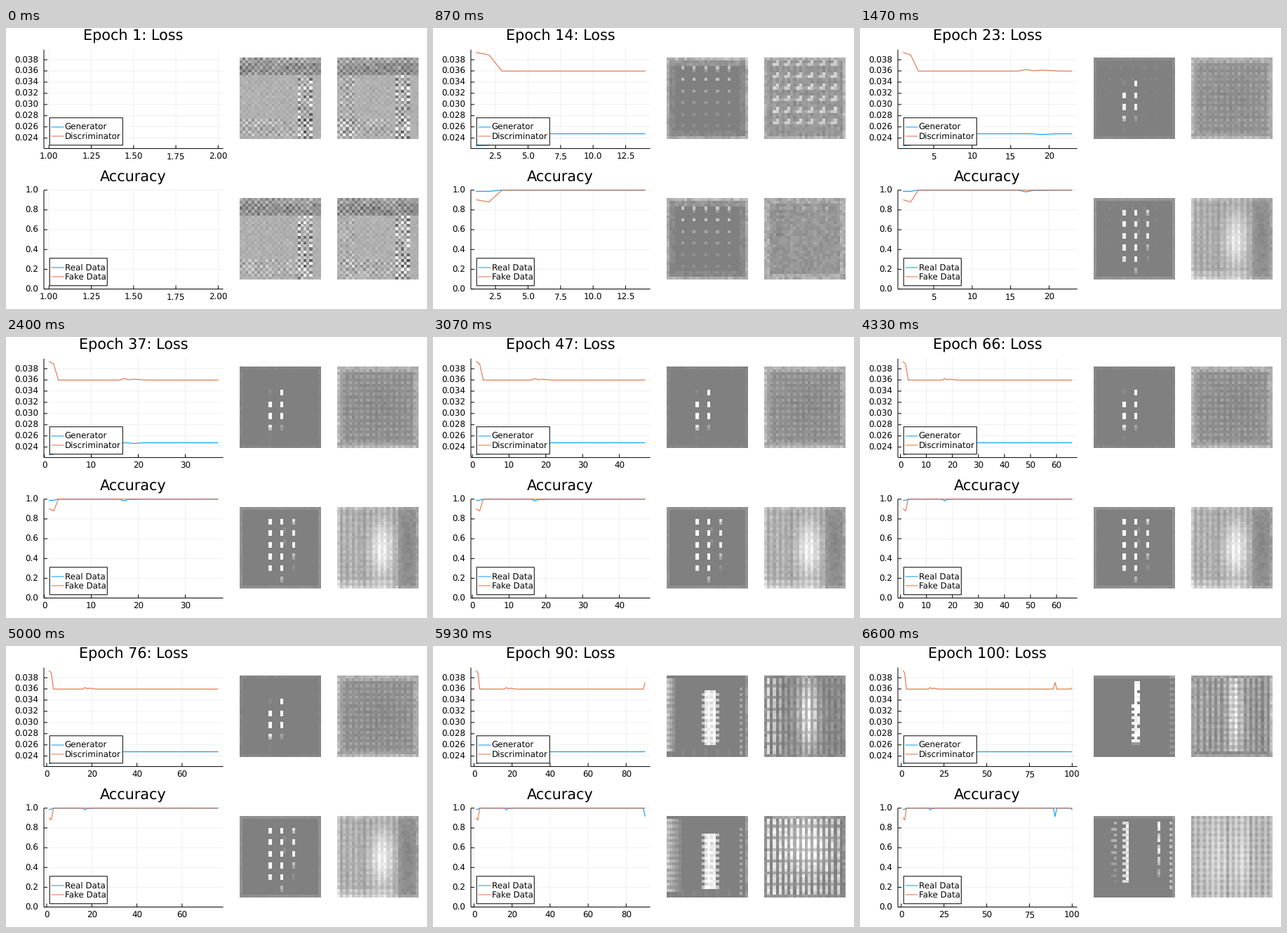
Animation, 600 px wide and 400 px high, one loop 6670 ms. Source, as a matplotlib script:

```python
import matplotlib.pyplot as plt
import numpy as np
from matplotlib.animation import FuncAnimation

EPOCHS, TICKS = 100, 3  # drawing ticks per epoch
LOOP = 6670
PX = 0.72  # points per pixel at 100 dpi
BLUE, ORANGE = "#009afa", "#e26f46"
LEFT, RIGHT, HEIGHT = 54, 309.6, 140.8
SMALL, LARGE = 11.85 * PX, 20.75 * PX

plt.rcParams.update({"font.family": "DejaVu Sans", "text.hinting": "none"})
rng = np.random.default_rng(7)

# ---------------------------------------------------------------- curves


def curve(level, bumps):
    y = np.full(EPOCHS, float(level))
    for epoch, value in bumps.items():
        y[epoch - 1] = value
    return y


gen_loss = curve(.02477, {1: .02263, 2: .02272, 18: .02474, 19: .02464, 20: .0247})
disc_loss = curve(.03597, {1: .0393, 2: .03885, 17: .03625, 18: .03602, 19: .03614,
                           20: .03608, 21: .036, 90: .03715, 100: .0362})
real_acc = curve(1, {1: .988, 2: .988, 17: .982, 18: .998, 19: .997, 20: .999,
                     90: .915, 100: .983})
fake_acc = curve(1, {1: .903, 2: .88, 100: .995})

# ---------------------------------------------------------------- samples

R, C = np.mgrid[0:28, 0:28]
EDGE = np.minimum(np.minimum(R, 27 - R), np.minimum(C, 27 - C))


def noise(a):
    return rng.uniform(-a, a, (28, 28))


def band(x, lo, hi):
    return (x >= lo) & (x <= hi)


def blob(r, c, sr, sc):
    return np.exp(-((R - r) / sr) ** 2 - ((C - c) / sc) ** 2)


def rim(depth, gain, a):
    return (EDGE < depth) * (gain + noise(a))


def checkers(left_gain):
    sign = 1 - 2 * ((R + C) % 2)
    right = band(C, 20, 24) & (R >= 6)
    top = band(R, 0, 5)
    low = band(R, 21, 26) & (C < 25)
    amp = .02 + right * np.where(C % 2 == 0, .15, .06) + .06 * top + .05 * low
    amp = amp + left_gain * (band(C, 1, 5) & (R > 5))
    amp = amp * (1 + noise(.9)) * np.where(C < 26, 1, .3)
    return .69 - top * np.where(R < 2, .06, .12) + amp * sign + noise(.02)


def dots(gain):
    grid = (R % 4 == 3) & (C % 4 == 1) & band(C, 5, 21) & (R < 24)
    fade = gain * np.exp(-np.maximum(R - 7, 0) / 6) + .05
    top = (R == 4) & (C % 4 == 1) & band(C, 9, 21)
    return (.5 + grid * fade + .1 * top + rim(1, .13, .05)
            + (EDGE < 3) * (.035 + noise(.03)) + (R < 3) * (.05 + noise(.04)))


def hooks():
    inner = band(R, 1, 23) & band(C, 3, 25)
    bar = (R % 4 == 2) & ((C % 4 == 3) | (C % 4 == 0))
    stem = (R % 4 == 1) & (C % 4 == 0)
    foot = (R % 4 == 2) & (C % 4 == 2)
    return (.57 + inner * (.21 * bar + .25 * stem + .08 * foot)
            + noise(.04) + rim(1, .1, .04) + .04 * (C % 2))


def grain():
    spots = (R % 4 == 3) & (C % 4 == 1) & band(C, 8, 24)
    return (.59 + noise(.045) + .12 * spots * np.exp(-R / 14) + rim(2, .08, .05)
            - .05 * (band(C, 4, 6) & (R % 2 == 0) & (R < 14)))


def dashes(columns, rims):
    img = .5 + rim(1, rims, .015)
    for c, first, values in columns:
        for i, v in enumerate(values):
            r = first + 4 * i
            img[r, c] = v
            img[r + 1, c] = .5 + (v - .5) * (.95 if v > .9 else .6)
    return img


def mesh():
    pits = (R % 2 == 1) & (C % 2 == 0)
    return (.565 + .075 * pits + noise(.025) + rim(2, .07, .03)
            + rim(1, .05, .03) - .035 * blob(14, 14, 9, 9))


def glow():
    stripe = (C % 2 == 0) * (.06 + .04 * (R % 2))
    return (.59 + .31 * blob(14, 15, 11, 4.5) + stripe * (C < 21) + noise(.03)
            + .06 * (C < 8) - .07 * blob(13, 23, 13, 4)
            + rim(1, .06, .04) + .07 * (R > 24) * (C < 20))


def pillar(width, first):
    rows = band(R, first, first + 18)
    core = rows & band(C, 13, 16)
    comb = rows & ((C == 12) | (C == 17)) & (R % 2 == 0)
    side = band(R, 1, 25) & (C < width)
    fade = (1 - C / width) * (.17 + .12 * (R % 2) + noise(.05))
    right = (C == 25) & (R % 2 == 0) & (R > 3)
    shade = np.where((R % 2 == 1) & (C % 2 == 1), .35, .46)
    return (.5 + core * (shade + noise(.05)) + comb * .28 + side * fade
            + .15 * right + (C == 27) * (.1 + noise(.05))
            + .03 * ((R > 24) & (C % 4 == 1)))


def combs(side, center, glare, base):
    on = (C % 2 == 1) * np.where(R % 4 == 3, .35, 1) * (EDGE > 0)
    gain = side * np.exp(-(C / 5.0) ** 2) + base * (1 + noise(.2))
    core = blob(13, 14.5, 13, 3.5)
    return (.5 + on * (gain + center * core) + center * core
            + glare * blob(9, 13, 11, 8) + noise(.03) + rim(1, .06, .05))


def zigzag():
    rows = band(R, 2, 22)
    mask = rows & ((C == 14) | ((C == 15) & (R % 4 != 1)) | ((C == 13) & (R % 2 == 0) & (R > 8)))
    img = .5 + mask * (.47 + noise(.06)) + .05 * (R == 0)
    img += .08 * ((C > 25) & (R % 2 == 0)) + .1 * ((R == 23) & band(C, 13, 15))
    return img


def rails():
    rows = band(R, 2, 22)
    pair = rows & ((C == 11) | ((C == 10) & (R % 2 == 0)))
    dim = rows & ((C == 7) | ((C == 6) & (R % 4 == 0))) & (R % 2 == 0)
    far = band(R, 2, 20) & (C == 22) & (R % 4 != 1)
    last = band(R, 1, 25) & (C == 26) & (R % 2 == 0)
    fade = 1 - np.maximum(R - 10, 0) / 16
    return (.5 + pair * (.35 + .12 * (R % 2)) + .2 * dim * fade
            + far * (.38 + noise(.1)) * fade + .24 * last
            + .05 * (R == 0) + .07 * (C == 27))


def weave():
    rows = band(R, 1, 25)
    return (.55 + rows * (C % 2 == 1) * (.1 + .05 * (R % 2))
            + rows * blob(12, 14.5, 17, 2.2) * (.2 + .1 * (R % 2))
            + noise(.035) + rim(1, .08, .04) - .04 * blob(14, 23, 12, 3))


def curtain():
    return (.75 + .1 * blob(14, 9, 14, 5) + .1 * blob(14, 17, 14, 3)
            - (C % 2 == 0) * (.12 - .03 * (R % 2)) + .03 * (R % 2)
            - .07 * (C == 12) - .05 * (C == 20) + noise(.025))


# rows of samples: top left, top right, bottom left, bottom right
STAGES = np.clip([
    [checkers(0), checkers(.06), checkers(0), checkers(.03)],
    [dots(.2), hooks(), dots(.22), grain()],
    [dashes([(10, 8, (.54, 1, 1, .9, .52)), (14, 8, (1, 1, 1, .65))], .025), mesh(),
     dashes([(10, 4, (.98, 1, 1, 1, .93)), (14, 4, (1, 1, 1, 1, 1, .72)),
             (18, 4, (.88, .93, .97, .75, .57)), (15, 7, (.57, .58))], .07), glow()],
    [pillar(3, 5), combs(.3, .22, 0, .08), pillar(5, 6), combs(.08, 0, .2, .3)],
    [zigzag(), weave(), rails(), curtain()],
], 0, 1)


def samples(n):
    k = np.interp(n, [1, 10, 15, 24, 78, 90, 97], [0, 1, 1, 2, 2, 3, 4])
    i = min(int(k), 3)
    return STAGES[i] + (k - i) * (STAGES[i + 1] - STAGES[i])


# ---------------------------------------------------------------- axes


def limits(n):
    hi = max(n, 2)
    pad = .03 * (hi - 1)
    return 1 - pad, hi + pad


def nice_ticks(n):
    """Score step sizes by count, coverage and roundness."""
    lo, hi = limits(n)
    best, choice = (-1, 0), None
    for z in (-1, 0, 1):
        for q, nice in ((1, 1), (5, .9), (2, .7), (2.5, .5), (3, .2)):
            step = q * 10.0 ** z
            first, last = int(np.ceil(lo / step)), int(np.floor(hi / step))
            k = last - first + 1
            if not 4 <= k <= 8:
                continue
            score = (.25 * (1 - abs(k - 5) / 5) + (first <= 0) / 6
                     + .5 * (hi - lo) / ((k - 1) * step) + .25 * nice)
            rank = (round(score, 9), -k)
            if rank > best:
                best, choice = rank, (step, np.arange(first, last + 1) * step)
    step, values = choice
    digits = next(d for d in (0, 1, 2) if abs(round(step, d) - step) < 1e-9)
    return [(v, f"{v:.{digits}f}") for v in values]


def to_x(v, n):
    lo, hi = limits(n)
    return LEFT + (v - lo) / (hi - lo) * (RIGHT - LEFT)


fig = plt.figure(figsize=(6, 4), dpi=100, facecolor="white")
ax = fig.add_axes([0, 0, 1, 1])
ax.axis("off")


def line(xs, ys, color="black", width=1.0, z=3):
    return ax.plot(xs, ys, color=color, lw=width * PX, zorder=z,
                   solid_capstyle="butt", snap=False)[0]


def grid_line(xs, ys):
    return line(xs, ys, "#e6e6e6", .6, 1)


def label(x, y, s, size=SMALL, ha="center", z=6):
    return ax.text(x, y, s, fontsize=size, ha=ha, va="baseline", zorder=z)


class Panel:
    def __init__(self, top, title, ylim, yticks, fmt, series, box_right):
        self.top, self.bottom, self.ylim = top, top + HEIGHT, ylim
        self.title = label(181.7, top - 12.8, title, LARGE)
        line([LEFT, RIGHT], [self.bottom] * 2)
        line([LEFT, LEFT], [top, self.bottom])
        for v in yticks:
            y = self.to_y(v)
            grid_line([LEFT, RIGHT], [y, y])
            line([LEFT, LEFT + 5], [y, y])
            label(46.5, y + 4.2, format(v, fmt), ha="right")
        self.slots = [(grid_line([], []), line([], []),
                       label(0, self.bottom + 15.6, "")) for _ in range(8)]

        y0 = top + 97
        ax.add_patch(plt.Rectangle((62.2, y0), box_right - 62.2, 39, fc="white",
                                   ec="black", lw=PX, zorder=4, snap=False))
        self.curves = []
        for i, (name, data, color) in enumerate(series):
            y = y0 + 13.2 + 13 * i
            line([64.5, 82.5], [y, y], color, z=5)
            label(83.8, y + 4.2, name, ha="left")
            self.curves.append((line([], [], color, 1.1), data))

    def to_y(self, v):
        lo, hi = self.ylim
        return self.bottom - (v - lo) / (hi - lo) * HEIGHT

    def update(self, n):
        xs = to_x(np.arange(1, n + 1), n)
        for art, data in self.curves:
            art.set_data(xs, self.to_y(data[:n]))
        ticks = nice_ticks(n)
        for i, (grid, tick, text) in enumerate(self.slots):
            shown = i < len(ticks)
            for art in (grid, tick, text):
                art.set_visible(shown)
            if shown:
                x = to_x(ticks[i][0], n)
                grid.set_data([x, x], [self.top, self.bottom])
                tick.set_data([x, x], [self.bottom - 5, self.bottom])
                text.set_x(x)
                text.set_text(ticks[i][1])


loss = Panel(30.8, "Epoch 1: Loss", (.02213, .0398), np.arange(24, 39, 2) / 1000, ".3f",
             [("Generator", gen_loss, BLUE), ("Discriminator", disc_loss, ORANGE)], 166.3)
accuracy = Panel(230.8, "Accuracy", (0, 1), np.arange(6) / 5, ".1f",
                 [("Real Data", real_acc, BLUE), ("Fake Data", fake_acc, ORANGE)], 144.3)

tiles = [ax.imshow(np.zeros((28, 28)), cmap="gray", vmin=0, vmax=1, aspect="auto",
                   interpolation="nearest", extent=(x, x + 115.5, y + 116, y))
         for y in (42, 242) for x in (332.7, 472.3)]
ax.set_xlim(0, 600)
ax.set_ylim(400, 0)


def update(tick):
    n = min((tick + 1) // TICKS + 1, EPOCHS)
    loss.title.set_text(f"Epoch {n}: Loss")
    loss.update(n)
    accuracy.update(n)
    for tile, img in zip(tiles, samples(n)):
        tile.set_data(img)
    return []


anim = FuncAnimation(fig, update, frames=EPOCHS * TICKS, interval=LOOP / (EPOCHS * TICKS),
                     repeat=True, repeat_delay=0, blit=False)
plt.show()
```
